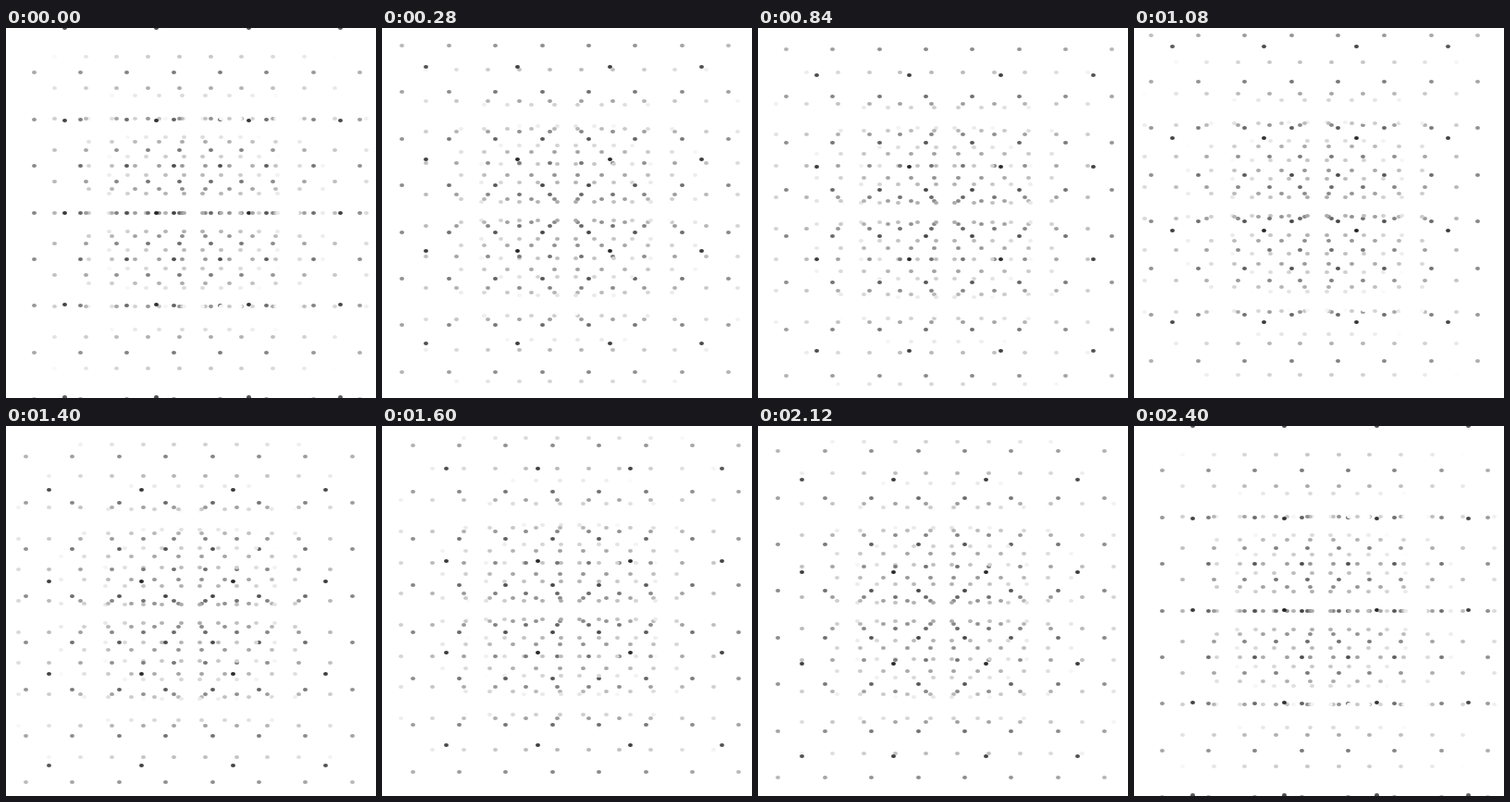
Write an HTML page with a canvas that moves like this. It is 400 by 400 pixels and loops after 2440 ms.

```html
<!DOCTYPE html>
<html>
<head>
<meta charset="utf-8">
<style>
  html, body { margin: 0; height: 100%; overflow: hidden; background: #fff; }
  canvas { display: block; }
</style>
</head>
<body>
<canvas id="stage" width="400" height="400"></canvas>
<script>
const ctx = document.getElementById('stage').getContext('2d');
const CENTER = 200, FOCAL = 102, NEAR = 0.025;
const EXTENT = 5, ORBIT = 0.625, FADE = 7.5;
const STEP = 40, STEPS = 60, LOOP = 2440;

function dot(x, y, z) {
  const scale = FOCAL / (z + NEAR);
  const px = Math.floor(CENTER + x * scale) + 0.5;
  const py = Math.floor(CENTER + y * scale);
  if (px < -3 || px > 403 || py < -3 || py > 403) return;
  const gray = Math.min(255, Math.round(255 * Math.hypot(x, y, z) / FADE));
  ctx.fillStyle = `rgb(${gray},${gray},${gray})`;
  ctx.beginPath();
  ctx.ellipse(px, py, 2.5, 2, 0, 0, 2 * Math.PI);
  ctx.fill();
}

// A cubic lattice circles around the viewer; distant points fade to white.
// Points are painted in lattice order, so some far ones cover nearer ones.
function draw(time) {
  const angle = Math.floor((time % LOOP) / STEP) / STEPS * 2 * Math.PI;
  const dx = ORBIT * Math.cos(angle), dy = ORBIT * Math.sin(angle);
  ctx.fillStyle = '#fff';
  ctx.fillRect(0, 0, 400, 400);
  for (let i = -EXTENT; i <= EXTENT; i++)
    for (let j = -EXTENT; j <= EXTENT; j++)
      for (let k = 1; k <= EXTENT; k++)
        dot(i + dx, j + dy, k);
}

function tick() {
  draw(performance.now());
  requestAnimationFrame(tick);
}
tick();
</script>
</body>
</html>
```
